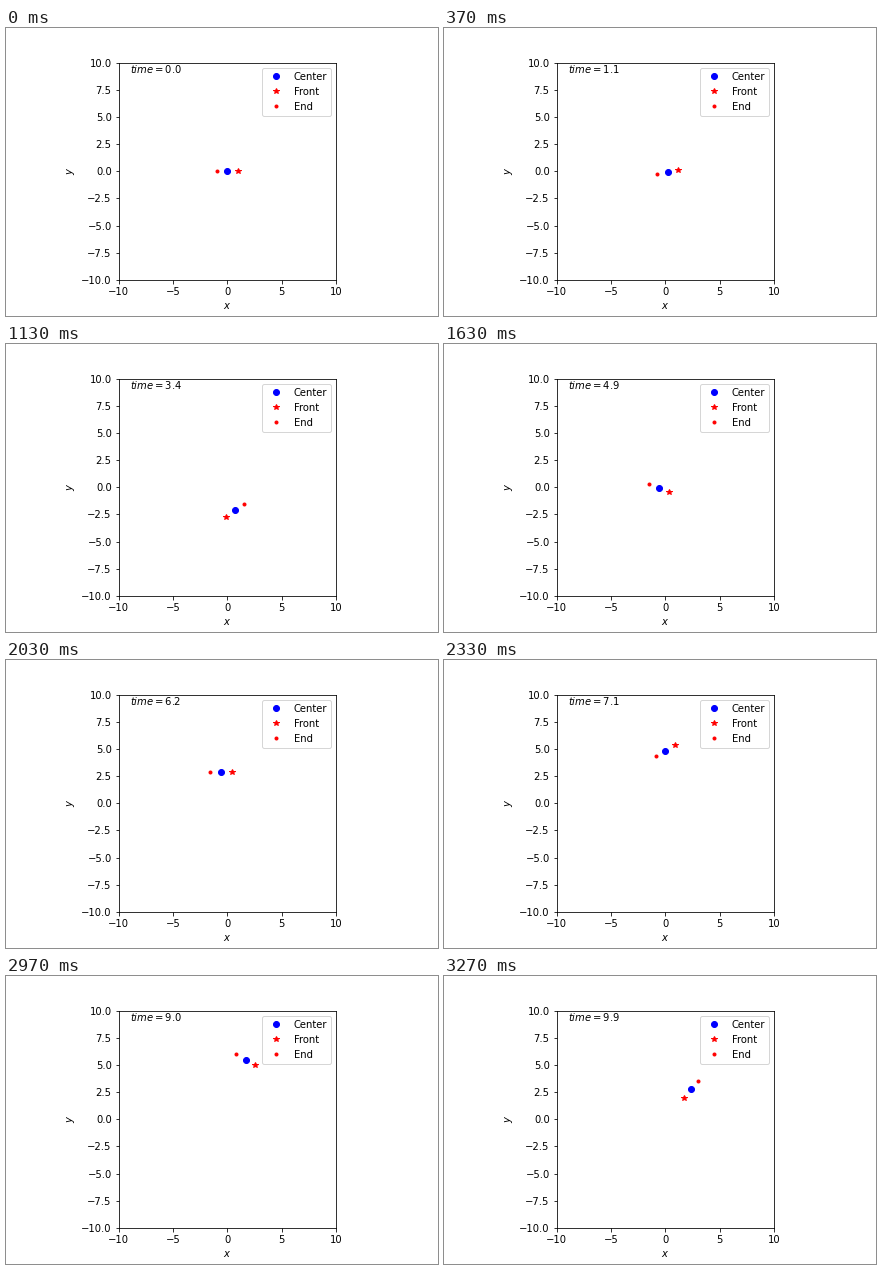
Recreate the animation shown at these times as a matplotlib script. Size 432 px wide and 288 px high, loop 3.31 s.

```python
import numpy as np
import matplotlib.pyplot as plt
from matplotlib.animation import FuncAnimation

STEPS = 99          # simulation states in one loop
TICK = 10           # ms per drawn frame
LOOP = 3310         # ms

# Each part swings between (time, value) turning points
X_TURNS = [(0.2, 0), (2.9, 0.85), (5.4, -0.72), (11, 2.65)]
Y_TURNS = [(0.8, 0), (3.2, -2.15), (8.4, 6.1), (11.4, -0.6)]
HEADING_TURNS = [(0, 0), (2.2, 20), (5, -382), (7.9, -319), (10.6, -520)]


def swing(t, turns):
    """Ease along a half cosine from one turning point to the next."""
    value = turns[0][1]
    for (t0, v0), (t1, v1) in zip(turns, turns[1:]):
        s = np.clip((t - t0) / (t1 - t0), 0, 1)
        value += (v1 - v0) * (1 - np.cos(np.pi * s)) / 2
    return value


plt.rcParams["font.family"] = "DejaVu Sans"
fig, ax = plt.subplots(figsize=(6, 4), dpi=72)
fig.subplots_adjust(left=0.125, right=0.9, bottom=0.125, top=0.88)
ax.set_aspect("equal")
ax.set(xlim=(-10, 10), ylim=(-10, 10), xlabel="$x$", ylabel="$y$",
       xticks=np.arange(-10, 11, 5), yticks=np.arange(-10, 10.1, 2.5))

center, = ax.plot([], [], "bo", label="Center")
front, = ax.plot([], [], "r*", label="Front")
end, = ax.plot([], [], "r.", label="End")
clock = ax.text(-9, 9, "")
ax.legend(loc="upper right")

# Moment each state appears, at 30 states per second on a 10 ms grid
STARTS = np.round(np.arange(STEPS) * 10 / 3).astype(int) * TICK


def draw(i):
    step = np.searchsorted(STARTS, i * TICK, side="right") - 1
    t = step * 10 / STEPS
    pos = np.array([[swing(t, X_TURNS)], [swing(t, Y_TURNS)]])
    angle = np.radians(swing(t, HEADING_TURNS))
    arm = np.array([[np.cos(angle)], [np.sin(angle)]])
    center.set_data(*pos)
    front.set_data(*(pos + arm))
    end.set_data(*(pos - arm))
    clock.set_text(f"$time={t:.1f}$")
    return center, front, end, clock


anim = FuncAnimation(fig, draw, frames=LOOP // TICK, interval=TICK,
                     repeat=True, repeat_delay=0)
plt.show()
```
